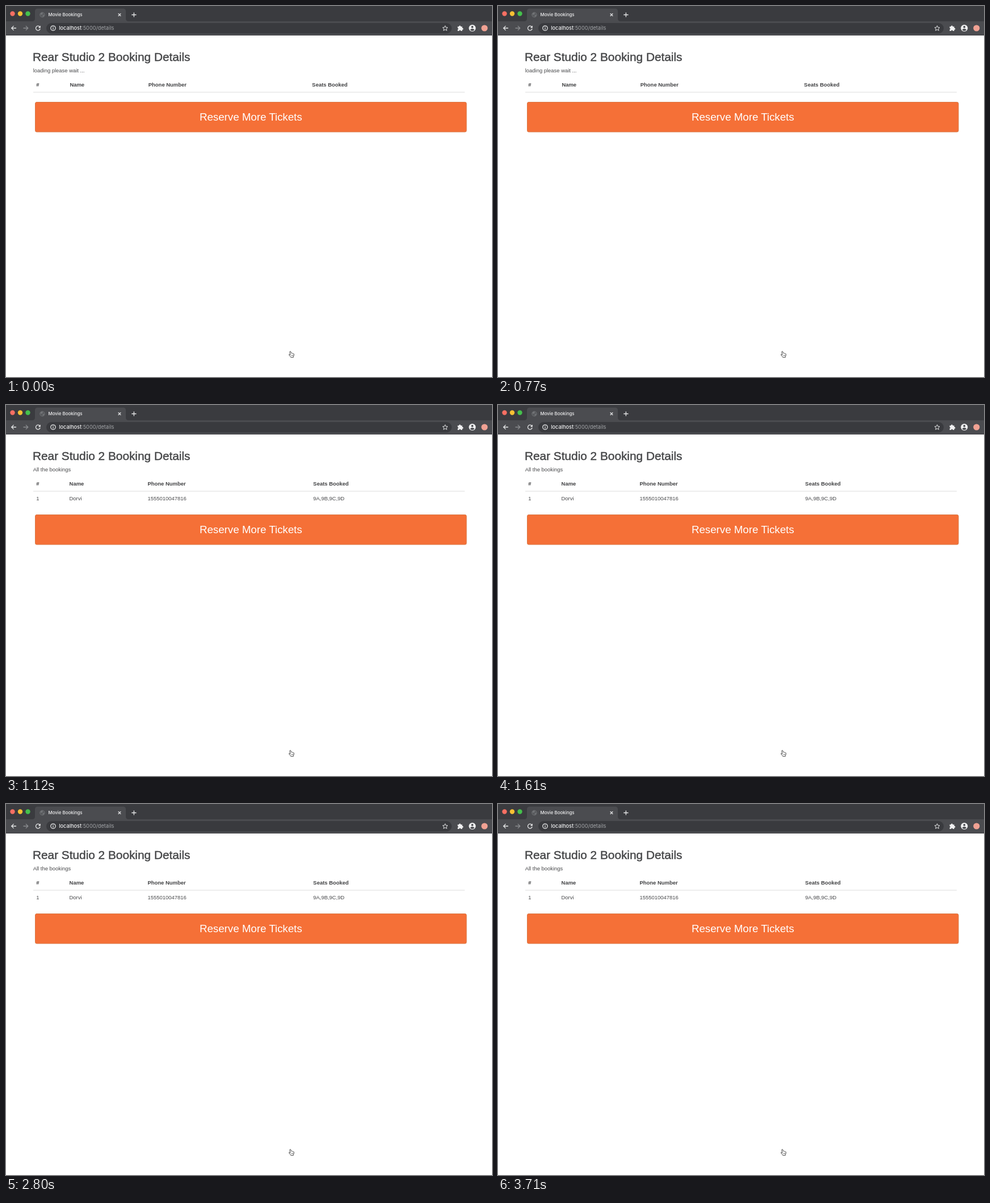
An HTML page that plays this animation: 856 px wide and 654 px high, repeating every 4.06 s.

```html
<!DOCTYPE html>
<html lang="en">
<head>
<meta charset="utf-8">
<title>Movie Bookings</title>
<style>
  html, body { margin: 0; width: 100%; height: 100%; overflow: hidden; background: #fff; }
  svg { display: block; width: 856px; height: 654px; }
  .page { font: 9.45px "Liberation Sans", Arial, sans-serif; fill: #48494b; }
  .page .title { font-size: 20.8px; fill: #464749; stroke: #464749; stroke-width: .45px; }
  .head { font-weight: bold; fill: #404143; }
  .page .label { font-size: 18.7px; fill: #fff; text-anchor: middle; }
  .chrome { font-family: Inter, Roboto, sans-serif; font-weight: 500; fill: #f1f1f2; }
  .line { fill: none; stroke: #e6e7e8; stroke-width: 1.3; }
</style>
</head>
<body>
<svg viewBox="0 0 856 654">
  <g class="chrome">
    <path fill="#3a3b3f" d="M0 0H856V52H0z"/>
    <path fill="#4b4c50" d="M0 27H46Q51 27 51 22V9.500Q51 4.500 56 4.500H206Q211 4.500 211 9.500V22Q211 27 216 27H856V51.500H0z"/>
    <rect x="71" y="30" width="714" height="18.500" rx="9.250" fill="#393a3e"/>
    <circle cx="11.500" cy="13.500" r="4.200" fill="#f96f63"/>
    <circle cx="25" cy="13.500" r="4.200" fill="#f7c033"/>
    <circle cx="38.500" cy="13.500" r="4.200" fill="#45c14c"/>

    <circle cx="64" cy="15.500" r="4.300" fill="#57595c" stroke="#707275" stroke-width=".9"/>
    <path fill="#727477" d="M61 12.500l3-1 1 2-2 2-2.500-.5zM65 15.500l2.500.5-1 2.500-2 .5z"/>
    <text x="74.500" y="18.400" font-size="7.900">Movie Bookings</text>
    <path class="line" d="M197.700 13.200l4.600 4.600m0-4.600l-4.600 4.600M221.300 15.500h8.200m-4.100-4.100v8.200"/>

    <path class="line" d="M18 39H9.800m3.800-3.900L9.700 39l3.900 3.900"/>
    <path class="line" style="stroke:#8a8c8f" d="M30.500 39h8.200m-3.800-3.900l3.900 3.900-3.900 3.900"/>
    <path class="line" d="M59.300 36.500A3.900 3.900 0 1 0 60.200 40"/>
    <path d="M60.800 34.500v4h-4z"/>
    <circle class="line" cx="83" cy="39" r="4.200" stroke-width="1"/>
    <path class="line" d="M83 38.500v2.800m0-4.700v1.100"/>
    <text y="42.300" font-size="9.200"><tspan x="93.200">localhost</tspan><tspan x="133" fill="#a5a7aa" font-weight="400">:5000/details</tspan></text>

    <path class="line" style="stroke-width:1" d="M773.500 34.700l1.300 3 3.200.3-2.400 2.100.7 3.200-2.800-1.700-2.800 1.700.7-3.200-2.400-2.100 3.200-.3z"/>
    <path d="M795.500 36.300h2.400a1.500 1.500 0 1 1 2.900 0h2.700v2.500a1.500 1.500 0 1 1 0 2.900v2.400h-2.400a1.500 1.500 0 0 0-3 0h-2.600v-2.500a1.500 1.500 0 0 0 0-2.900z"/>
    <circle cx="821.300" cy="39" r="6.100"/>
    <path fill="#4b4c50" d="M821.300 35a1.900 1.900 0 1 1 0 3.800 1.900 1.900 0 1 1 0-3.800M817.500 42q1.400-1.900 3.800-1.900t3.800 1.900q-1.500 1.900-3.800 1.900t-3.800-1.900"/>
    <circle cx="842.800" cy="39" r="5.600" fill="#f0a193"/>
  </g>

  <g class="page">
    <text class="title" x="47" y="96.800">Rear Studio 2 Booking Details</text>
    <text id="status" x="47.700" y="117.300"></text>
    <g class="head">
      <text x="53.300" y="142.400">#</text>
      <text id="name" y="142.400">Name</text>
      <text id="phone" y="142.400">Phone Number</text>
      <text id="seats" y="142.400">Seats Booked</text>
    </g>
    <path stroke="#dedede" stroke-width="1.200" d="M48 152H808"/>
    <g id="row">
      <text x="53.300" y="167.700">1</text>
      <text x="111.500" y="167.700">Dorvi</text>
      <text x="249.500" y="167.700">1555010047816</text>
      <text x="541" y="167.700">9A,9B,9C,9D</text>
    </g>
    <g id="button">
      <rect x="51.500" y="169.500" width="759.500" height="52.500" rx="2.500" fill="#f57037" stroke="#d97947"/>
      <text class="label" x="431.300" y="202.400">Reserve More Tickets</text>
    </g>
  </g>

  <path fill="#fff" stroke="#3c3c3c" stroke-width=".9" stroke-linejoin="round" d="M500.700 615.200l-.9-5.100q-.1-1.300.8-1.400t1.200 1.100l.6 2.300q1.300-.8 1.700.3 1.200-.6 1.600.4 1.400-.2 1.500 1.200.2 2.700-1 4.200v1.200h-4.500q-.4-1.300-1.600-2.300-1.600-1.700-1.800-2.600.5-1.300 2.400.7z"/>
  <path stroke="#555" stroke-width=".6" d="M502.800 615v2.300m1.400-2.300v2.300m1.300-2.300v2.300"/>
</svg>
<script>
  const LOOP = 4060, LOADED_AT = 840;
  const el = id => document.getElementById(id);
  let shown;

  function show(loaded) {
    el("status").textContent = loaded ? "All the bookings" : "loading please wait ...";
    el("name").setAttribute("x", loaded ? 111.6 : 112.4);
    el("phone").setAttribute("x", loaded ? 249.5 : 250.8);
    el("seats").setAttribute("x", loaded ? 541.1 : 539.1);
    el("row").style.display = loaded ? "" : "none";
    el("button").setAttribute("transform", `translate(0 ${loaded ? 24 : 0})`);
  }

  function tick() {
    const loaded = performance.now() % LOOP >= LOADED_AT;
    if (loaded !== shown) show(shown = loaded);
    requestAnimationFrame(tick);
  }
  tick();
</script>
</body>
</html>
```
